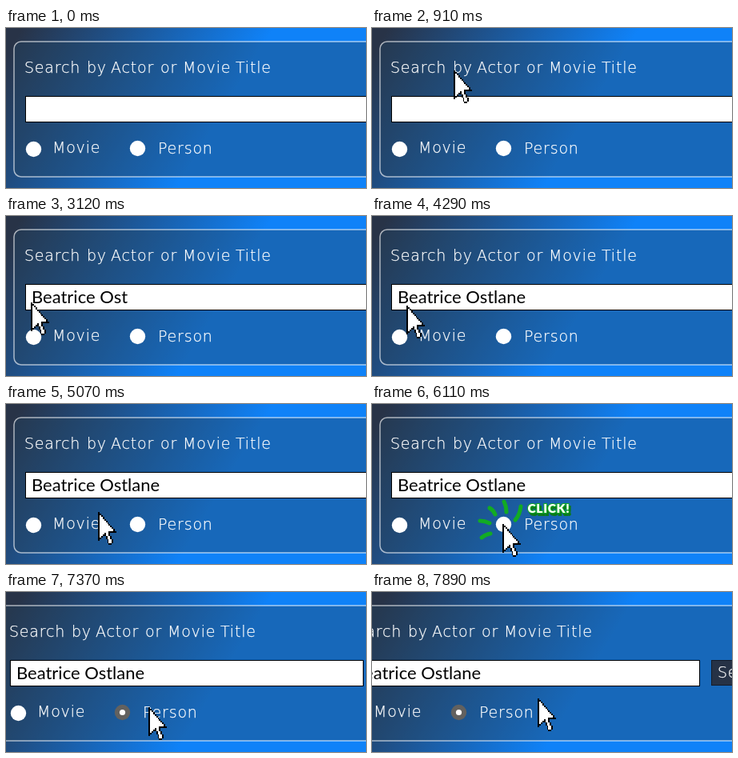
An HTML page that plays this animation: 450x200 px, repeating every 8000 ms.

```html
<!DOCTYPE html>
<html lang="en">
<head>
<meta charset="utf-8">
<title>Search form</title>
<style>
html, body { margin: 0; width: 100%; height: 100%; overflow: hidden; }
svg { display: block; width: 100%; height: 100%; }
.label { font: 200 19px "DejaVu Sans", sans-serif; letter-spacing: .8px; fill: #fff; stroke: #fff; stroke-width: .25px; }
.query { font: 400 22px Lato, sans-serif; fill: #000; }
.click { font: 900 15.5px Lato, sans-serif; letter-spacing: .7px; }
</style>
</head>
<body>
<svg viewBox="0 0 450 200">
  <defs>
    <linearGradient id="sky" gradientUnits="userSpaceOnUse" x1="0" y1="0" x2="246" y2="148">
      <stop offset=".06" stop-color="#283347"/>
      <stop offset="1" stop-color="#0f82f8"/>
    </linearGradient>
  </defs>
  <rect width="450" height="200" fill="url(#sky)"/>
  <g id="form">
    <rect x="10" y="17" width="620" height="169" rx="9" fill="#23415d" fill-opacity=".4"
      stroke="#fff" stroke-opacity=".62" stroke-width="1.5"/>
    <text class="label" y="56">
      <tspan x="23">Search</tspan> <tspan x="101">by</tspan> <tspan x="131">Actor</tspan>
      <tspan x="193">or</tspan> <tspan x="221">Movie</tspan> <tspan x="287">Title</tspan>
    </text>
    <rect x="24.5" y="85.5" width="441" height="32" fill="#fff" stroke="#000"/>
    <text class="query" id="query" x="32" y="109"></text>
    <rect x="480.5" y="85.5" width="96" height="31" fill="#263246" stroke="#141b28"/>
    <text class="label" x="488" y="107">Search</text>
    <circle cx="34.5" cy="151.5" r="9.7" fill="#fff"/>
    <text class="label" x="58" y="156">Movie</text>
    <circle id="ring" cx="164.5" cy="150.5" r="9.7"/>
    <circle cx="164.5" cy="150.5" r="3.6" fill="#fff"/>
    <text class="label" x="190" y="157">Person</text>
  </g>
  <g id="rays" fill="none" stroke="#12ab24" stroke-width="5" stroke-linecap="round">
    <path pathLength="1" d="M148 162Q142 163 137 167"/>
    <path pathLength="1" d="M147 149Q141 146 135 146"/>
    <path pathLength="1" d="M154 138Q152 133 147 130"/>
    <path pathLength="1" d="M168 135Q168 128 165 122"/>
    <path pathLength="1" d="M179 145Q185 138 186 128"/>
  </g>
  <g id="click" class="click">
    <text x="196.5" y="138.5" fill="#0b7a1c" stroke="#0b7a1c" stroke-width="2">CLICK!</text>
    <text x="194.5" y="136" fill="#fff" stroke="#12ab24" stroke-width="2" paint-order="stroke">CLICK!</text>
  </g>
  <g id="cursor" shape-rendering="crispEdges">
    <path id="edge"/>
    <path id="face" fill="#fff"/>
  </g>
</svg>
<script>
const LOOP = 8000, STEP = 130;
const NAME = "Beatrice Ostlane";
const $ = id => document.getElementById(id);
const clamp = (v, lo, hi) => Math.min(hi, Math.max(lo, v));
const stairs = n => "h1v1".repeat(n);

$("edge").setAttribute("d", "M0 0" + stairs(12) +
  "h-4v2h1v2h1v2h-1v1h-2v-1h-1v-2h-1v-2h-2v1h-1v1h-1v1h-1z");
$("face").setAttribute("d", "M1 2" + stairs(9) +
  "h-3v3h1v2h1v2h-2v-2h-1v-2h-1v-2h-1v1h-1v1h-1v1h-1z");

// Whole steps taken since a start time, from 0 up to max
const steps = (t, start, max) => clamp(Math.floor((t - start) / STEP) + 1, 0, max);

function cursorAt(t) {
  const enter = steps(t, 130, 11);
  const cross = steps(t, 4290, 11);
  const leave = steps(t, 7240, 6);
  if (leave) return [163 + 7.3 * leave, 150 - 2.8 * leave];
  if (cross) return [31.5 + 11.95 * cross, 108 + 3.82 * cross];
  return [224.5 - 17.55 * enter, -43 + 13.73 * enter];
}

function draw(t) {
  const scroll = steps(t, 7240, 6) * 9.33;
  $("form").setAttribute("transform", `translate(${-Math.round(scroll)} 0)`);
  $("query").textContent = NAME.slice(0, steps(t, 1690, NAME.length));
  $("ring").setAttribute("fill", t < 7110 ? "#fff" : "#62615f");

  const burst = t < 7110 ? steps(t, 5850, 3) : 0;
  $("rays").style.display = burst ? "" : "none";
  $("rays").setAttribute("stroke-dasharray", `${burst / 3} 2`);
  $("click").style.display = burst === 3 ? "" : "none";

  const [x, y] = cursorAt(t).map(Math.round);
  $("cursor").setAttribute("transform", `translate(${x} ${y}) scale(1.92 2.14)`);
}

function tick() {
  draw(performance.now() % LOOP);
  requestAnimationFrame(tick);
}
tick();
</script>
</body>
</html>
```
